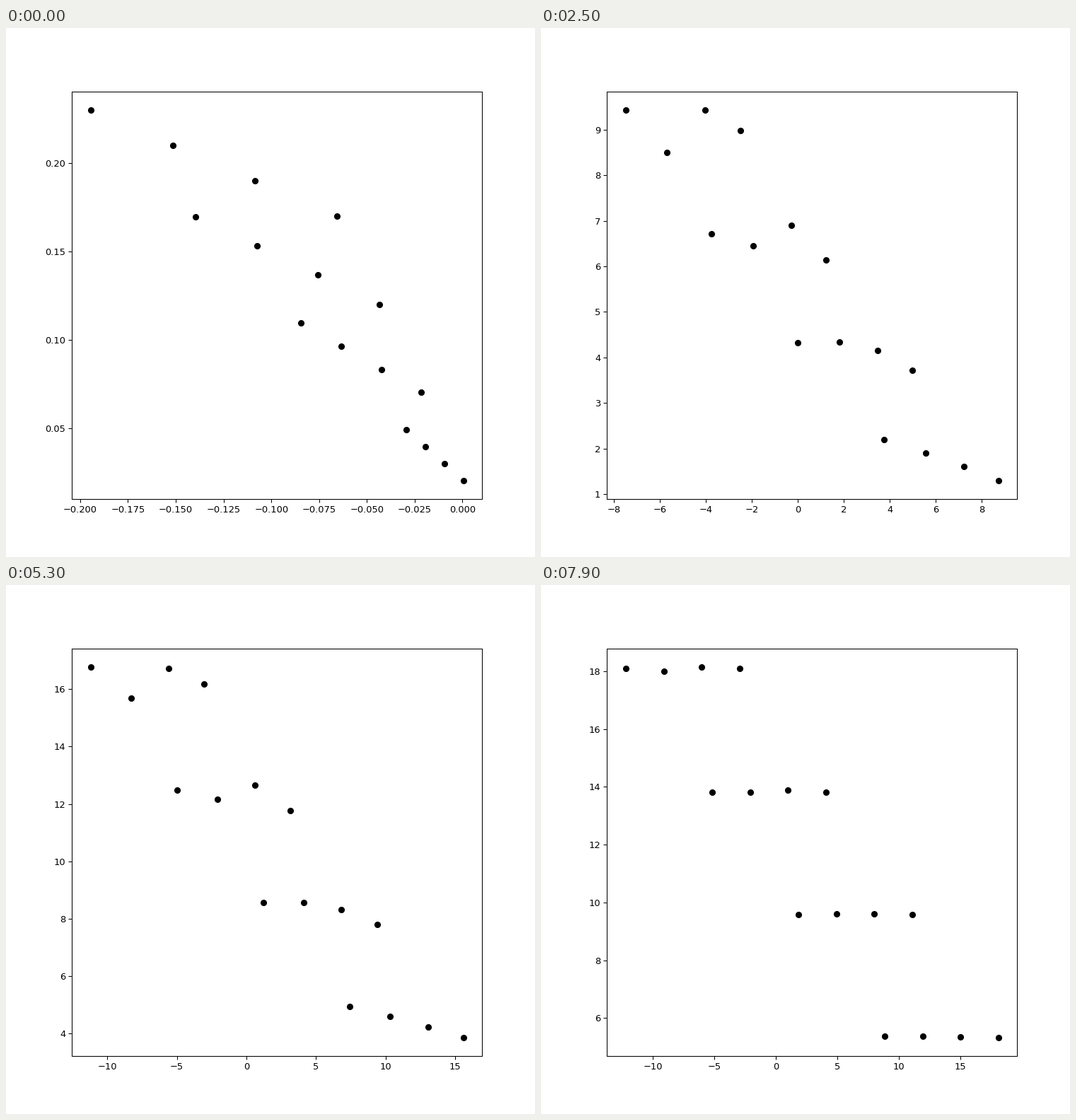
Recreate the animation shown at these times as a matplotlib script. Size 748 px wide and 748 px high, loop 8000 ms.

```python
import numpy as np
import matplotlib.pyplot as plt
from matplotlib.animation import FuncAnimation

FRAMES = 80
KEYS = np.array([0, 9, 25, 36, 53, 63, 79])
SETTLE = .56

row, col = np.divmod(np.arange(16), 4)
c = col - 1.5
dome = 1.25 - c**2
ripple = -.9 * (1 - row / 3) * np.cos(2.4 * (col - 1) + .96 * row)

# Shape of the 4 x 4 net at the key times, without the settling key
SHAPE = dict(
    x_top=[-.13, -2.49, -4.92, -6.03, -7.03, -7.57],
    x_step=[.0385, 1.74, 3.74, 4.88, 6.21, 7.01],
    x_slope=[.043, .72, 1.66, 2.09, 2.72, 3.085],
    x_tilt=[-.011, 0, 0, 0, 0, 0],
    y_top=[.2, 3.4, 9.04, 12.45, 16.28, 18.08],
    y_step=[-.055, -.94, -2.43, -3.16, -3.96, -4.24],
    y_slope=[-.02, .1, 0, 0, -.03, .02],
    y_tilt=[.0035, -.09, -.1, -.19, -.11, -.012],
    bend=[0, .05, 0, 0, 0, 0],
    wave=[0, 0, .6, 1, .68, .08],
)


def make_track(values, drift=0):
    """Values and slopes at KEYS; the net settles towards its last shape."""
    v = np.array(values)
    v = np.insert(v, 5, v[4] + SETTLE * (v[5] - v[4]))
    m = np.gradient(v, KEYS, edge_order=2)
    m[0] = .4 * (v[1] - v[0]) / KEYS[1] + drift
    return v, m


def sample(track, t):
    """Cubic Hermite interpolation between key values."""
    v, m = track
    k = min(np.searchsorted(KEYS, t, side="right") - 1, len(KEYS) - 2)
    h = KEYS[k + 1] - KEYS[k]
    s = (t - KEYS[k]) / h
    ease = s * s * (3 - 2 * s)
    return (v[k] + ease * (v[k + 1] - v[k])
            + h * s * (1 - s) * ((1 - s) * m[k] - s * m[k + 1]))


# The whole net dips a little before it starts to rise
tracks = {name: make_track(values, -.095 if name == "y_top" else 0)
          for name, values in SHAPE.items()}


def net(t):
    p = {name: sample(track, t) for name, track in tracks.items()}

    def plane(axis):
        return (p[axis + "_top"] + p[axis + "_step"] * row
                + c * (p[axis + "_slope"] + p[axis + "_tilt"] * row))

    x = plane("x") + .12 * p["wave"] * dome - .12 * p["bend"] * c * row**3
    y = plane("y") + p["wave"] * ripple + p["bend"] * dome
    return x, y


fig, ax = plt.subplots(figsize=(8, 8), dpi=93.5)
fig.subplots_adjust(left=.1249)
dots, = ax.plot([], [], "ko")


def update(i):
    dots.set_data(*net(i))
    ax.relim()
    ax.autoscale_view()
    return dots,


anim = FuncAnimation(fig, update, frames=FRAMES, interval=100,
                     repeat=True, repeat_delay=0)
plt.show()
```
